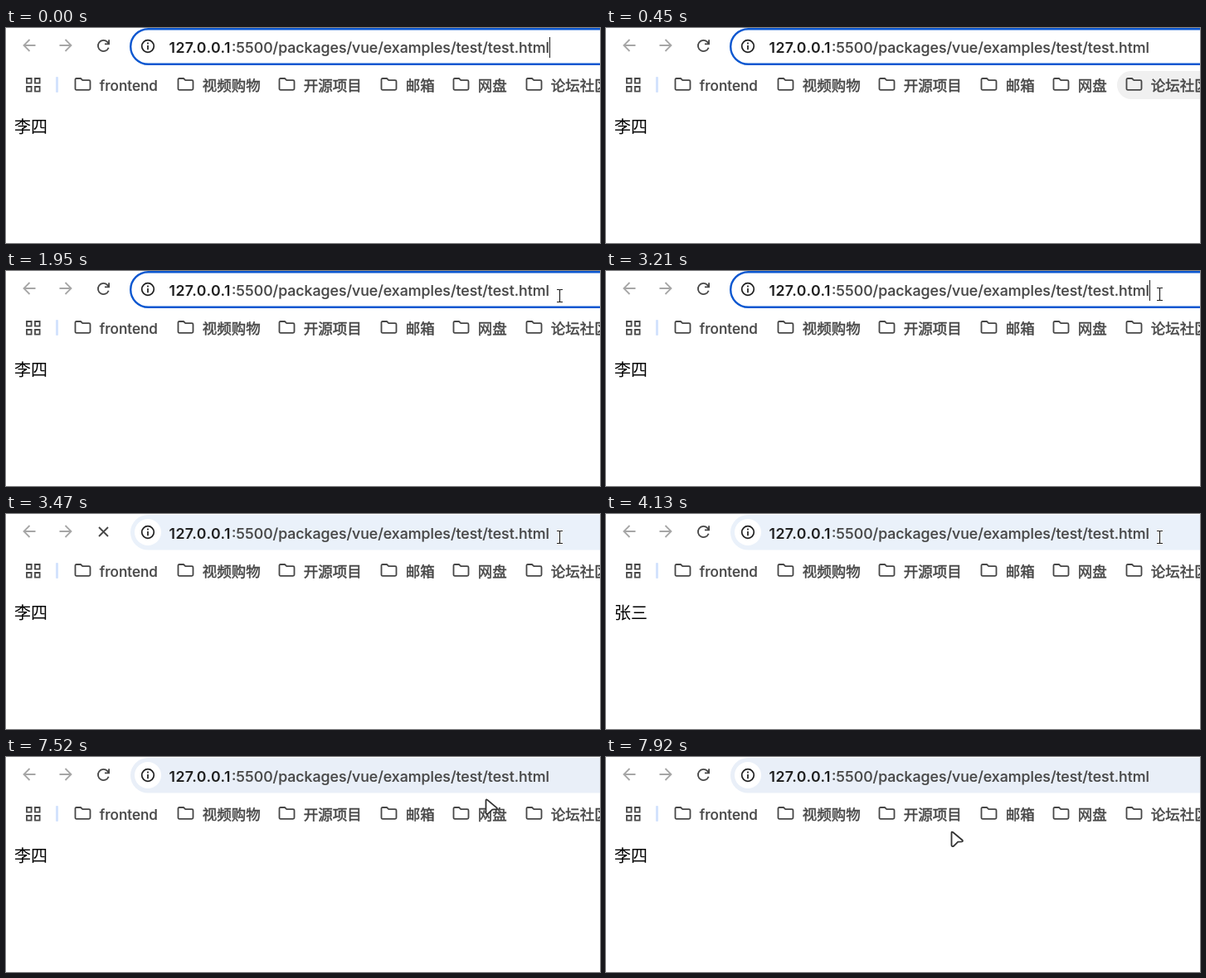
These frames come from a looping animation (716 by 260 pixels, 8000 ms). An HTML page:

```html
<!DOCTYPE html>
<html lang="zh-CN">
<head>
<meta charset="utf-8">
<title>Page reload</title>
<style>
  html, body { margin: 0; height: 100%; overflow: hidden; background: #fff; }
  svg { display: block; width: 716px; height: 260px; }
  text { font-family: Inter, "Noto Sans CJK SC", sans-serif; white-space: pre; }
  .line { fill: none; stroke: #474747; stroke-width: 1.8; }
  .label { font-size: 17.5px; font-weight: 500; fill: #474747; stroke: #474747; stroke-width: .5; }
  .latin { font-size: 17.15px; stroke-width: .2; }
  .url { font-size: 17.73px; font-weight: 500; fill: #474747; stroke: #474747; stroke-width: .15; }
  .host { font-weight: 600; letter-spacing: .4px; fill: #1f1f1f; stroke: none; }
  .page { font: 20px "Noto Sans CJK SC", sans-serif; fill: #000; }
  .beam { fill: none; stroke: #fff; stroke-width: 2.8; }
  .beam + .beam { stroke: #222; stroke-width: 1.2; }
</style>
</head>
<body>
<svg viewBox="0 0 716 260">
  <defs>
    <path id="folder" class="line" d="M1 13.3V2.5Q1 1 2.5 1H7.5L9.8 3.2H17.5Q19 3.2 19 4.7V13.3Q19 14.8 17.5 14.8H2.5Q1 14.8 1 13.3Z"/>
    <path id="back" fill="none" stroke="#a6a6a6" stroke-width="1.8" d="M7.5 0H-6.5M.5-7L-6.5 0L.5 7"/>
    <path id="caliper" d="M-3.5-7.5H-1Q0-7.5 0-6.5Q0-7.5 1-7.5H3.5M0-7V7M-3.5 7.5H-1Q0 7.5 0 6.5Q0 7.5 1 7.5H3.5"/>
  </defs>

  <use href="#back" x="28" y="21"/>
  <use href="#back" transform="translate(72 21) scale(-1 1)"/>
  <path id="reload" class="line" d="M123.7 23.8A6.6 6.6 0 1 1 122.2 16.8L124 18.8M124.1 14.3V19.4H119"/>
  <path id="stop" class="line" d="M112 16L123 27M123 16L112 27"/>

  <rect id="focused" x="150.2" y="1.2" width="700" height="42.6" rx="21.3" fill="#fff" stroke="#0b57d0" stroke-width="2.4"/>
  <g id="blurred">
    <rect id="bar" x="150" y="1" width="700" height="42.5" rx="21.25"/>
    <circle cx="171" cy="22" r="16" fill="#fff"/>
  </g>
  <g fill="none" stroke="#1f1f1f" stroke-width="1.7">
    <circle cx="171" cy="22" r="7.3"/>
    <path d="M171 17.6V19.4M171 21V26.2"/>
  </g>
  <text class="url" y="30"><tspan class="host" x="196.5">127.0.0.1</tspan><tspan x="272">:5500/packages/vue/examples/test/test.html</tspan></text>
  <rect id="caret" x="655" y="11" width="1" height="25" fill="#1f1f1f"/>

  <rect id="hover" x="616" y="52" width="200" height="34" rx="17" fill="#f0f0f0"/>
  <path class="line" d="M25 61h5.6v5.6h-5.6zM35 61h5.6v5.6h-5.6zM25 71h5.6v5.6h-5.6zM35 71h5.6v5.6h-5.6z"/>
  <rect x="60" y="59" width="3" height="19" rx="1" fill="#d3e3fd"/>
  <g id="bookmarks"></g>

  <text id="name" class="page" x="10" y="127"></text>

  <g id="beam">
    <use class="beam" href="#caliper"/>
    <use class="beam" href="#caliper"/>
  </g>
  <path id="arrow" fill="#fff" stroke="#333" stroke-width="1.8" stroke-linejoin="round" d="M1.5 3Q1.5.8 3.2 2L14.5 11.5Q15.8 13 13.8 13.3L9.2 13.7L4.2 18.6Q1.6 20 1.5 17.5Z"/>
</svg>
<script>
const LOOP = 8000;
const $ = id => document.getElementById(id);
const show = (id, on) => $(id).setAttribute('visibility', on ? 'visible' : 'hidden');
const between = (t, a, b) => t >= a && t < b;
const progress = (t, a, b) => Math.min(1, Math.max(0, (t - a) / (b - a)));
const easeOut = p => 1 - (1 - p) ** 2;
const smooth = p => p * p * (3 - 2 * p);
const mix = (a, b, p) => a + (b - a) * p;

const bookmarks = [[82.5, 'frontend'], [206.5, '视频购物'], [328.5, '开源项目'],
  [451.5, '邮箱'], [538.5, '网盘'], [626.5, '论坛社区']];
$('bookmarks').innerHTML = bookmarks.map(([x, label]) =>
  `<use href="#folder" x="${x}" y="60"/>` +
  `<text class="label${/^\w/.test(label) ? ' latin' : ''}" x="${x + 30.3}" y="76.2">${label}</text>`
).join('');

function pointer(t) {
  const enter = easeOut(progress(t, 1460, 1950));
  const settle = progress(t, 2080, 2130);
  const leave = smooth(progress(t, 7250, 7920));
  return {
    x: mix(mix(659.5, 667.5, enter), 415, leave),
    y: mix(mix(37.5, 30, enter) - 2 * settle, 89, leave)
  };
}

function draw(t) {
  const focus = t < 3470;
  const loading = between(t, 3470, 4130);
  show('focused', focus);
  show('blurred', !focus);
  show('stop', loading);
  show('reload', !loading);
  show('caret', t < 450 || between(t, 2100, 2680) || between(t, 3210, 3470));
  $('hover').setAttribute('opacity', t < 450 ? 0 : 1 - progress(t, 1490, 1650));
  $('name').textContent = between(t, 3900, 6890) ? '张三' : '李四';

  const { x, y } = pointer(t);
  const inBar = y < 45;
  $('bar').setAttribute('fill', inBar ? '#eaf1fa' : '#e9eff8');
  show('beam', t >= 1460 && inBar);
  show('arrow', t >= 1460 && !inBar);
  $(inBar ? 'beam' : 'arrow').setAttribute('transform', `translate(${x} ${y})`);
}

function tick() {
  draw(performance.now() % LOOP);
  requestAnimationFrame(tick);
}
tick();
</script>
</body>
</html>
```
